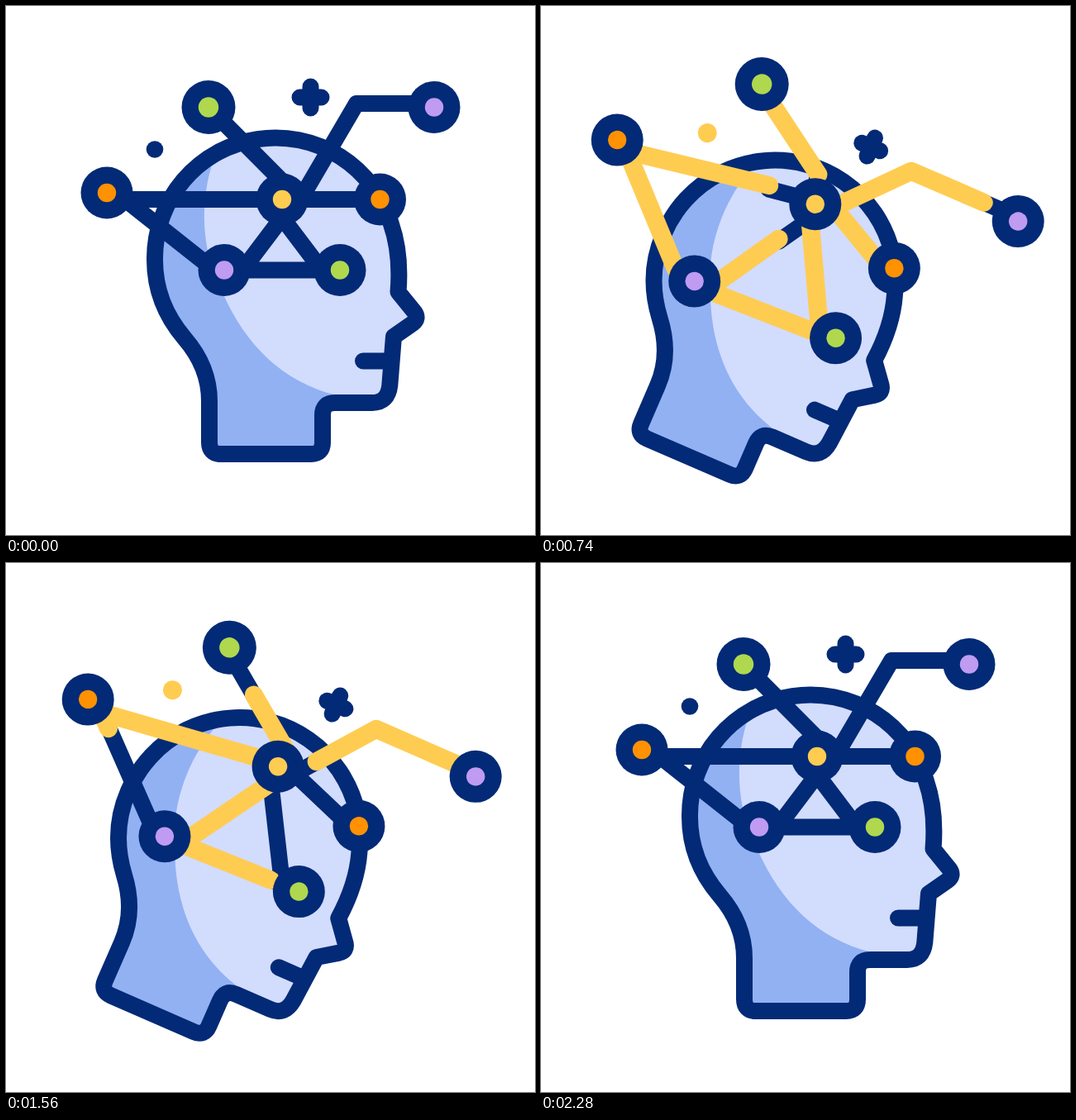
These frames come from a looping animation (640x640 px, 2.4 s). An HTML page:

```html
<!DOCTYPE html>
<html lang="en">
<head>
<meta charset="utf-8">
<title>Thinking head</title>
<style>
  html, body { margin: 0; height: 100%; overflow: hidden; background: #fff; }
  svg { display: block; width: 100%; height: 100%; }
  .line { fill: none; stroke: #032a76; stroke-width: 20; stroke-linecap: round; stroke-linejoin: round; }
  .glow { stroke: #ffcc52; stroke-width: 22; }
</style>
</head>
<body>
<svg viewBox="0 0 640 640">
  <defs>
    <path id="outline" d="M246 528V478C246 450 235 424 216 402C193 375 180 343 180 307A146 146 0 0 1 466 264
      C474 287 477 315 474.5 346L494 370Q500 378 492 384L469 400L464.3 459Q462 480 443 480H398Q383 480 383 495V528
      Q383 542 369 542H260Q246 542 246 528Z"/>
    <clipPath id="inside"><use href="#outline"/></clipPath>
  </defs>
  <g id="scene">
    <use href="#outline" fill="#d2dcfd"/>
    <g clip-path="url(#inside)">
      <path id="shade" fill="#92b1f3" d="M258 168C237 215 229 285 263 349C290 410 335 455 400 471L390 560H150V150Z"/>
    </g>
    <use href="#outline" class="line"/>
    <path class="line" d="M432 429.5H466"/>
    <path class="line" id="plus"/>
    <circle cx="180" cy="173.5" r="10.3" fill="#032a76"/>
    <circle id="dot" cx="180" cy="173.5" fill="#ffcc52"/>
  </g>
</svg>
<script>
const NAVY = '#032a76', YELLOW = '#ffcc52', ORANGE = '#ff9102', GREEN = '#afd84f', LILAC = '#bf9bf2';
const [scene, shade, plus, dot] = ['scene', 'shade', 'plus', 'dot'].map(id => document.getElementById(id));

// Resting place, outward shift, core colour, extra radius
const nodes = {
  A: [122, 226, -50, -2, ORANGE],
  B: [245, 122.5, -36, -38, GREEN, 1],
  C: [518, 122.5, 64, 0, LILAC],
  D: [334, 234, 0, -43, YELLOW],
  E: [452.5, 234, 0, 0, ORANGE],
  F: [264, 319.5, -35, 32, LILAC],
  G: [404, 319.5, 22, 26, GREEN],
  bend: [424, 118, 1, 0]
};

// Each link runs through points given as a node plus an offset
const links = [
  [['D', 0, 22], ['G', -22, 0], ['F', 22, 0], ['D', 0, 22]],
  [['F', -22, -8], ['A', 22, 8], ['D', -22, 0]],
  [['B', 16, 16], ['D', 0, -22]],
  [['E', -22, 0], ['D', 22, 0], ['bend', 0, 0], ['C', -22, -4.5]]
];

function add(tag, attrs) {
  const el = document.createElementNS('http://www.w3.org/2000/svg', tag);
  return set(scene.appendChild(el), attrs);
}
function set(el, attrs) {
  for (const key in attrs) el.setAttribute(key, attrs[key]);
  return el;
}

const blue = links.map(() => add('path', { class: 'line', pathLength: 1 }));
const glow = links.map(() => add('path', { class: 'line glow', pathLength: 1 }));
const discs = Object.entries(nodes).filter(([, n]) => n[4]).map(([name, n]) => {
  const extra = n[5] || 0;
  return [name, add('circle', { r: 31.5 + extra, fill: NAVY }), add('circle', { r: 11.2 + extra, fill: n[4] })];
});

const clamp = x => Math.min(1, Math.max(0, x));
const smooth = x => (x = clamp(x), x * x * (3 - 2 * x));
const cubic = x => (x = clamp(x), x < .5 ? 4 * x ** 3 : 1 - 4 * (1 - x) ** 3);

function place([name, dx = 0, dy = 0], spread) {
  const [x, y, sx, sy] = nodes[name];
  return [x + sx * spread + dx, y + sy * spread + dy];
}
const route = (link, spread) => 'M' + link.map(point => place(point, spread).join(' ')).join('L');

function draw(t) {
  const mirrored = Math.min(t, 2300 - t);
  const nod = cubic((t - 45) / 1085) - cubic((t - 1190) / 1045);
  const spread = smooth(t < 1060 ? (t - 20) / 1040 : (2260 - t) / 1200);
  const head = smooth((t - 180) / 700);
  const tail = smooth((t - 1250) / 765);
  const lit = head - tail;

  set(scene, {
    transform: `translate(${314.5 - 167 * nod} ${542 + 4 * nod}) rotate(${28.7 * nod}) translate(-314.5 -542)`
  });
  set(shade, { transform: `translate(${-4 * nod})` });

  for (const [name, ...circles] of discs) {
    const [cx, cy] = place([name], spread);
    circles.forEach(c => set(c, { cx, cy }));
  }
  // Blue fills what the glow leaves; the glow stretches with its own lit length
  links.forEach((link, i) => {
    set(blue[i], {
      d: route(link, spread),
      'stroke-dasharray': lit > .001 ? `${tail} ${lit} 2 2` : 'none'
    });
    set(glow[i], {
      d: route(link, lit),
      'stroke-dasharray': `${lit} 2`,
      'stroke-dashoffset': -tail,
      visibility: lit > .001 ? 'visible' : 'hidden'
    });
  });

  const arm = 13 - 3.6 * Math.sin(Math.PI * nod) ** 2;
  set(plus, {
    d: `M${-arm} 0H${arm}M0 ${-arm}V${arm}`,
    transform: `translate(368.5 110.5) rotate(${90 * smooth((mirrored - 250) / 500)})`
  });
  set(dot, { r: 11.5 * smooth((mirrored - 145) / 300) });
}

function tick(now) {
  draw(Math.min(Math.floor(now % 2400 / 20) * 20, 2280));
  requestAnimationFrame(tick);
}
draw(0);
requestAnimationFrame(tick);
</script>
</body>
</html>
```
